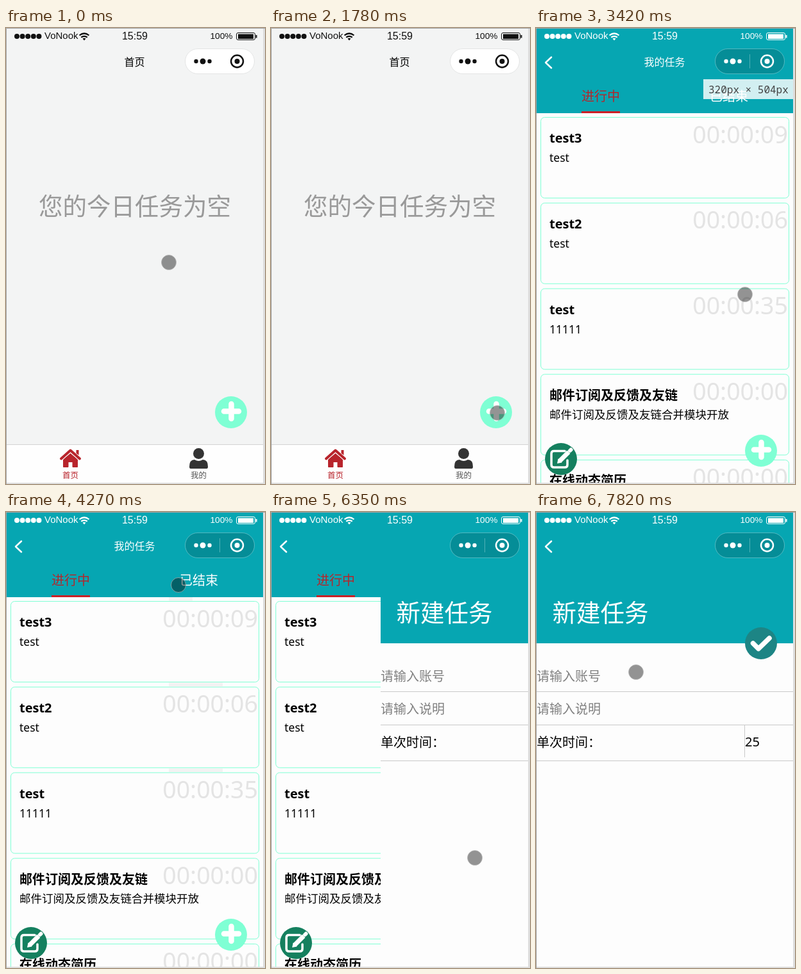
An HTML page that plays this animation: 404x712 px, repeating every 8 s.

```html
<!DOCTYPE html>
<html lang="zh-CN">
<head>
<meta charset="utf-8">
<title>任务</title>
<style>
html, body { margin: 0; width: 100%; height: 100%; overflow: hidden; background: #fff; }
svg { display: block; width: 404px; height: 712px; font-family: "Noto Sans", "Noto Sans CJK SC", "Noto Sans CJK", sans-serif; }
.status { font-family: "Liberation Sans", Arial, sans-serif; }
.mid { text-anchor: middle; }
.end { text-anchor: end; }
.big { font-size: 37.5px; }
.line { fill: none; stroke-linecap: round; stroke-linejoin: round; }

/* every change is a hard cut on one shared 8 s clock */
.t { animation: 8s step-end infinite; }
.ink { animation-name: ink; }
.home { animation-name: home; }
.teal { animation-name: teal; }
.list-title { animation-name: list-title; }
.list { animation-name: list; }
.cards { animation-name: cards; }
.trail { animation-name: trail; }
.trail-wide { animation-name: trail-wide; }
.form { animation-name: form; }
.size { animation-name: size; }
.caret { animation-name: caret; }
.cursor { animation-name: cursor; }

@keyframes ink { 0% { color: #111; } 39%, 100% { color: #fff; } }
@keyframes home { 0% { visibility: visible; } 39%, 100% { visibility: hidden; } }
@keyframes teal { 0% { visibility: hidden; } 39%, 100% { visibility: visible; } }
@keyframes list-title { 0% { visibility: hidden; } 39% { visibility: visible; } 77.875%, 100% { visibility: hidden; } }
@keyframes cards { 0% { visibility: hidden; } 40.875%, 100% { visibility: visible; } }
@keyframes trail { 0% { visibility: hidden; } 44.625%, 100% { visibility: visible; } }
@keyframes trail-wide { 0% { visibility: hidden; } 56.5%, 100% { visibility: visible; } }
@keyframes size { 0% { visibility: hidden; } 39% { visibility: visible; } 50%, 100% { visibility: hidden; } }
@keyframes caret { 0% { visibility: hidden; } 91.5% { visibility: visible; } 97.75%, 100% { visibility: hidden; } }
@keyframes list {
  0% { transform: translateX(500px); }
  39% { transform: translateX(386px); }
  40.875% { transform: translateX(95px); }
  42.75%, 100% { transform: none; }
}
@keyframes form {
  0% { transform: translateX(500px); }
  77.875% { transform: translateX(386px); }
  79.375% { transform: translateX(170px); }
  81.25%, 100% { transform: none; }
}
@keyframes cursor {
  0% { transform: translate(254px, 366px); }
  9% { transform: translate(277px, 440px); }
  10.5% { transform: translate(308px, 534px); }
  12.375% { transform: translate(326px, 566px); }
  13.875% { transform: translate(341px, 590px); }
  15.5% { transform: translate(352px, 605px); }
  17% { transform: translate(356px, 610px); }
  18.875% { transform: translate(352px, 610px); }
  20.75% { transform: translate(357px, 600px); }
  22.25% { transform: translate(353px, 601px); }
  40.875% { transform: translate(345px, 550px); }
  42.75% { transform: translate(326px, 416px); }
  44.625% { transform: translate(268px, 174px); }
  46.5% { transform: translate(263px, 125px); }
  48.125% { transform: translate(300px, 101px); }
  50% { transform: translate(272px, 83px); }
  51.875% { transform: translate(267px, 96px); }
  53.375% { transform: translate(269px, 114px); }
  55% { transform: translate(306px, 400px); }
  56.5% { transform: translate(341px, 590px); }
  58.375% { transform: translate(346px, 645px); }
  60% { transform: translate(348px, 671px); }
  61.875% { transform: translate(344px, 674px); }
  69.125% { transform: translate(350px, 672px); }
  71% { transform: translate(351px, 667px); }
  79.375% { transform: translate(318px, 540px); }
  81.25% { transform: translate(211px, 225px); }
  83.125% { transform: translate(197px, 225px); }
  84.625% { transform: translate(184px, 226px); }
  86.5% { transform: translate(168px, 240px); }
  88%, 100% { transform: translate(156px, 250px); }
}
</style>
</head>
<body>
<svg viewBox="0 0 404 712">
  <defs>
    <clipPath id="screen"><path d="M1 1H401V710H1Z"/></clipPath>
    <g id="plus">
      <circle r="25" fill="#7fffd4"/>
      <path class="line" d="M-11-1.500H12M.5-13V10" stroke="#fff" stroke-width="8.500"/>
    </g>
  </defs>

  <path d="M0 0H404V712H0Z" fill="#dedede"/>
  <g clip-path="url(#screen)">
    <!-- home page -->
    <path d="M1 1H401V710H1Z" fill="#f3f4f4"/>
    <text class="big mid" x="201" y="292" fill="#999">您的今日任务为空</text>
    <use href="#plus" x="351" y="600"/>
    <path d="M1 650H401V710H1Z" fill="#fefefe"/>
    <g class="t home">
      <path d="M1 650.5H401" stroke="#d3d3d3"/>
      <g fill="#b8242c" stroke="#b8242c">
        <path class="line" d="M86 672.500L100.500 659.500 115 672.500" stroke-width="4"/>
        <path d="M109.500 659H113.500V667L109.500 664Z" stroke="none"/>
        <path d="M89.500 674L100.500 664.500 111.500 674V685.500H104V677.500H97V685.500H89.500Z" stroke-linejoin="round"/>
      </g>
      <g fill="#333">
        <circle cx="300.500" cy="664.500" r="8.500"/>
        <path d="M288 688Q286 688 286 685 286 674 294 674 300.500 678 307 674 315 674 315 685 315 688 313 688Z"/>
      </g>
      <g class="mid" font-size="12.500">
        <text x="100.500" y="702.500" fill="#b8242c">首页</text>
        <text x="300.500" y="702.500" fill="#555">我的</text>
      </g>
    </g>

    <!-- task list -->
    <g class="t list">
      <path d="M1 80H401V710H1Z" fill="#f3f3f3"/>
      <g class="t cards">
        <path d="M1 80H401V710H1Z" fill="#fdfdfd"/>
        <g id="cards"></g>
        <g fill="#f2f2f2">
          <path class="t trail" d="M254 133H291V138.500H254ZM254 266.500H338V272.500H254ZM254 400.500H338V406H254Z"/>
          <path class="t trail-wide" d="M338 266.500H353V272.500H338ZM338 400.500H353V406H338ZM267 534.500H353V539.500H267Z"/>
        </g>
      </g>
      <path d="M1 80H401V133H1Z" fill="#06a6b2"/>
      <g class="mid" font-size="20">
        <text x="101" y="113.500" fill="#b5262b">进行中</text>
        <text x="301" y="113.500" fill="#fff">已结束</text>
      </g>
      <path d="M71 130H131V133H71Z" fill="#cb2026"/>
      <use href="#plus" x="351" y="660"/>
      <circle cx="39" cy="673" r="25" fill="#15805f"/>
      <g class="line" stroke="#fff">
        <path d="M45 660.500H28Q24 660.500 24 664.500V682Q24 686 28 686H45Q49 686 49 682V675" stroke-width="3.500"/>
        <path d="M37 676L51 662" stroke-width="7" stroke-linecap="butt"/>
        <path d="M53 660L54.500 658.500" stroke-width="6"/>
      </g>
      <path d="M33 680L34.500 672.500 40.500 678.500Z" fill="#fff"/>
    </g>

    <!-- navigation bar -->
    <path class="t teal" d="M1 1H401V80H1Z" fill="#06a6b2"/>

    <!-- new task form -->
    <g class="t form">
      <path d="M1 80H401V710H1Z" fill="#fdfdfd"/>
      <path d="M1 80H401V205H1Z" fill="#06a6b2"/>
      <text class="big" x="25.500" y="171" fill="#fff">新建任务</text>
      <circle cx="351" cy="205" r="25" fill="#1d8585"/>
      <path class="line" d="M338.500 205L347 213.500 364 197" stroke="#fff" stroke-width="7.500"/>
      <path d="M1 280.500H401M1 332.500H401M1 388.500H401M325.500 333V383" stroke="#c9c9c9"/>
      <g font-size="20">
        <text x="1" y="263.500" fill="#808080">请输入账号</text>
        <text x="1" y="314.500" fill="#808080">请输入说明</text>
        <text x="1" y="366.500">单次时间：</text>
        <text x="326" y="366">25</text>
      </g>
      <path class="t caret" d="M1 242H2V268H1Z"/>
    </g>

    <g class="t home">
      <text class="mid" x="200.500" y="59" font-size="16">首页</text>
      <rect x="279.500" y="32.500" width="108" height="39" rx="19.500" fill="#fff" stroke="#e3e4e4"/>
    </g>
    <g class="t teal">
      <path class="line" d="M24 45.500L15 54 24 62.500" stroke="#fff" stroke-width="2.500"/>
      <rect x="279.500" y="32.500" width="108" height="39" rx="19.500" fill="#000" fill-opacity=".15" stroke="#fff" stroke-opacity=".3"/>
      <path d="M333.500 41V63" stroke="#fff" stroke-opacity=".3"/>
    </g>
    <text class="t list-title mid" x="200.500" y="59" font-size="16" fill="#fff">我的任务</text>

    <!-- status bar and capsule icons -->
    <g class="t ink status" fill="currentColor">
      <path class="line" d="M17 13h.01m8.600 0h.01m8.600 0h.01m8.600 0h.01m8.600 0h.01" stroke="currentColor" stroke-width="8"/>
      <text x="60" y="17" font-size="15">VoNook</text>
      <path d="M114.500 11.500Q122 5.500 129.500 11.500M117.200 14.700Q122 11 126.800 14.700" fill="none" stroke="currentColor" stroke-width="2.200"/>
      <path d="M119.500 16.500Q122 14.800 124.500 16.500L122 19.500Z"/>
      <text class="mid" x="201" y="18" font-size="16">15:59</text>
      <text class="end" x="353.500" y="17" font-size="13.700">100%</text>
      <rect x="359.500" y="7.500" width="29" height="11" rx="2.500" fill="none" stroke="currentColor"/>
      <path d="M362 9.500H386V17H362ZM389.500 11H391.500V15.500H389.500Z"/>
      <circle cx="296.500" cy="52" r="3.200"/>
      <circle cx="307" cy="52" r="4.500"/>
      <circle cx="317.500" cy="52" r="3.200"/>
      <circle cx="360.500" cy="52" r="9.500" fill="none" stroke="currentColor" stroke-width="2.500"/>
      <circle cx="360.500" cy="52" r="4"/>
    </g>

    <g class="t size">
      <path d="M261 80H401V111H261Z" fill="#fff" fill-opacity=".82"/>
      <text x="269" y="102" font-size="16" fill="#444" font-family="'Noto Sans Mono', 'DejaVu Sans Mono', monospace">320px × 504px</text>
    </g>

    <g class="t cursor">
      <circle r="11.500" fill="#000" fill-opacity=".42" stroke="#b4b4b4" stroke-opacity=".7"/>
    </g>
  </g>
  <path d="M.5 712V.5H404" fill="none" stroke="#a3a3a3"/>
</svg>
<script>
const tasks = [
  ['test3', 'test', '09'],
  ['test2', 'test', '06'],
  ['test', '11111', '35'],
  ['邮件订阅及反馈及友链', '邮件订阅及反馈及友链合并模块开放', '00'],
  ['在线动态简历', '', '00'],
];
const card = ([title, note, sec], i) => `
  <g transform="translate(7 ${139 + i * 133.75})">
    <rect x=".5" y=".5" width="387" height="126" rx="6" fill="#fdfdfd" stroke="#7fffd4"/>
    <text class="big end" x="386" y="40.5" fill="#e4e4e4">00:00:${sec}</text>
    <text x="14" y="40.3" font-size="20" font-weight="700">${title}</text>
    <text x="14" y="70" font-size="17.5">${note}</text>
  </g>`;
document.getElementById('cards').innerHTML = tasks.map(card).join('');
</script>
</body>
</html>
```
